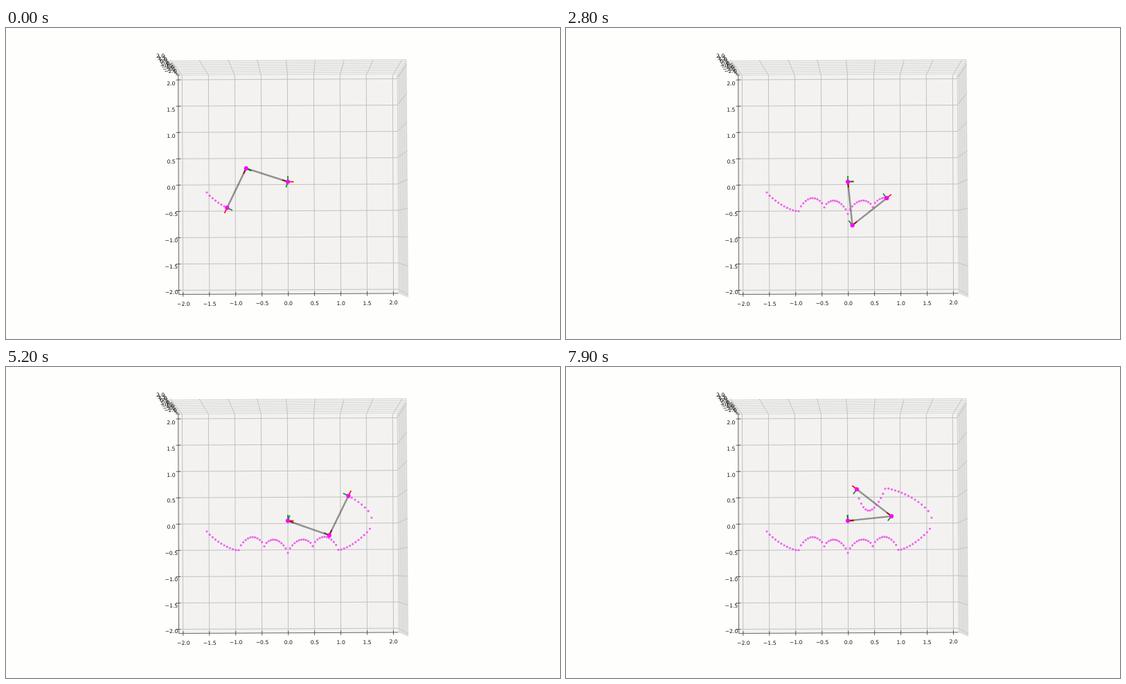
An HTML page with a canvas for the animation above (8000 ms loop, 800 by 450 pixels).

```html
<!DOCTYPE html>
<html lang="en">
<head>
<meta charset="utf-8">
<title>Two-link arm</title>
<style>
html, body { margin: 0; width: 100%; height: 100%; overflow: hidden; background: #fefefd; }
canvas { display: block; }
</style>
</head>
<body>
<canvas id="stage" width="800" height="450"></canvas>
<script>
const ctx = document.getElementById('stage').getContext('2d');
const LOOP = 8000, STEP = 100, LINK = 63.3, AXIS = 8.5;
const BASE = [407, 222.5];

const mix = (a, b, f) => a + (b - a) * f;
const lerp = (p, q, f) => [mix(p[0], q[0], f), mix(p[1], q[1], f)];
const polar = ([x, y], angle, r) => [x + r * Math.cos(angle), y - r * Math.sin(angle)];

function trace(points) {
  ctx.beginPath();
  points.forEach(p => ctx.lineTo(...p));
}
function line(points, color, width) {
  trace(points);
  ctx.strokeStyle = color;
  ctx.lineWidth = width;
  ctx.stroke();
}
function area(points, color) {
  trace(points);
  ctx.fillStyle = color;
  ctx.fill();
}
function dot([x, y], r, color) {
  ctx.beginPath();
  ctx.arc(x, y, r, 0, 2 * Math.PI);
  ctx.fillStyle = color;
  ctx.fill();
}

// The tip moves in arches: even steps in x, raised by height; skew shifts the crest
const path = [[290, 238]];
function hop(x, y, height, steps = 11, skew = 1) {
  const from = path[path.length - 1];
  for (let k = 1; k <= steps; k++) {
    const u = k / steps, p = lerp(from, [x, y], u);
    p[1] -= height * Math.max(0, Math.sin(Math.PI * u ** skew)) ** 0.7;
    path.push(p);
  }
}
hop(336, 265, -5.3);
hop(373, 259.5, 16);
hop(407, 269, 14);
hop(443, 259.2, 14);
hop(480, 264.5, 16);
hop(525.5, 234, -5.6);
hop(528, 218, 0, 1);
hop(461, 176, 11, 14, 0.7);
hop(420, 177, -31.3, 13, 1.25);

// Progress slows as the trail grows: [ms, path index]
const pace = [[0, 7], [1100, 31], [4500, 68], [6500, 85], [7900, 94]];
function progress(t) {
  const i = Math.max(1, pace.findIndex(p => p[0] >= t));
  const [t0, n0] = pace[i - 1], [t1, n1] = pace[i];
  return Math.round(mix(n0, n1, (t - t0) / (t1 - t0)));
}

function drawBox() {
  const tl = [248.7, 69], tr = [564.5, 67.5], br = [566.5, 384], bl = [249.5, 385.5];
  const ftl = [230, 47], ftr = [578.5, 45], fbr = [581, 390];
  ctx.fillStyle = '#fefefd';
  ctx.fillRect(0, 0, 800, 450);
  area([tl, tr, br, bl], '#f3f2f1');
  area([ftl, ftr, tr, tl], '#f5f5f4');
  area([tr, ftr, fbr, br], '#f1f1f0');

  ctx.font = '7.7px "DejaVu Sans", sans-serif';
  ctx.textAlign = 'center';
  ctx.textBaseline = 'middle';
  const grid = '#bcbcbc', ink = '#333';
  const label = (text, x, y) => { ctx.fillStyle = '#111'; ctx.fillText(text, x, y); };
  for (let k = 0; k < 9; k++) {
    const v = k / 2 - 2, f = k / 8;
    const text = (v < 0 ? '\u2212' : '') + Math.abs(v).toFixed(1);
    const x = mix(255.8, 559.5, f), y = mix(379.5, 75, f);
    const floor = mix(385.4, 384, f), depth = lerp(tl, ftl, mix(0.04, 0.96, f));
    line([[x, floor], [mix(254.4, 558.3, f), 68.5], [mix(237, 572, f), 46]], grid, 0.9);
    line([[249, y], [mix(566.4, 564.5, f), mix(378, 73.5, f)],
      [mix(581, 578.6, f), mix(386, 52.5, f)]], grid, 0.9);
    line([depth, lerp(tr, ftr, mix(0.04, 0.96, f)), lerp(br, fbr, mix(0.04, 0.96, f))],
      '#c4c4c4', 0.7);
    line([[x, floor - 3], [x, floor + 3.5]], ink, 0.8);
    line([[245.5, y + 0.2], [252, y]], ink, 0.8);
    line([[depth[0] - 3, depth[1] - 0.5], [depth[0] + 3, depth[1]]], ink, 0.8);
    label(text, mix(256.3, 559.5, f), mix(399.8, 398.4, f));
    label(text, mix(239, 238.3, f), mix(383.3, 81, f));
    label(text, mix(237.5, 223, f), mix(62.8, 40.8, f));
  }
  line([ftl, tl, bl, br], '#555', 0.9);
}

function axes(p, angle) {
  line([p, polar(p, angle + Math.PI / 2, AXIS)], '#138a22', 1.7);
  line([p, polar(p, angle, AXIS)], '#f01010', 1.7);
}

function drawArm(t) {
  const n = progress(t), tip = path[n];
  const dx = tip[0] - BASE[0], dy = BASE[1] - tip[1];
  const first = Math.atan2(dy, dx) - Math.acos(Math.hypot(dx, dy) / (2 * LINK));
  const elbow = polar(BASE, first, LINK);
  const second = Math.atan2(elbow[1] - tip[1], tip[0] - elbow[0]);

  axes(BASE, 0);
  axes(BASE, first);
  axes(elbow, second);
  axes(tip, second);
  line([BASE, elbow, tip], 'rgba(0,0,0,0.4)', 2.5);
  path.slice(0, n + 1).forEach(p => dot(p, 1.6, 'rgba(242,60,236,0.8)'));
  [BASE, elbow, tip].forEach(p => dot(p, 3.1, '#f808f4'));
}

function frame(now) {
  drawBox();
  drawArm(Math.floor(now % LOOP / STEP) * STEP);
  requestAnimationFrame(frame);
}
frame(0);
</script>
</body>
</html>
```
